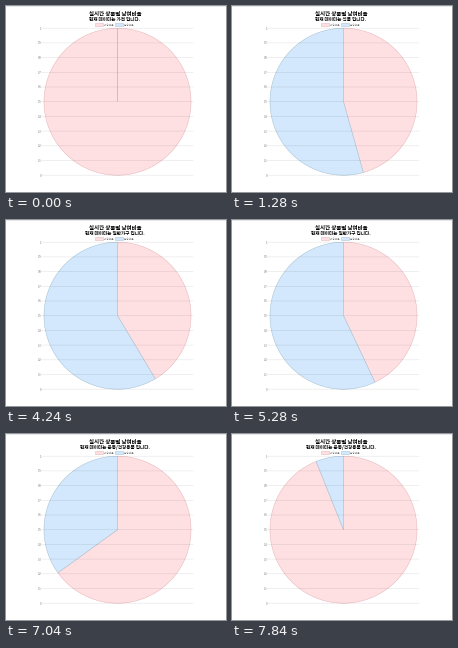
Animation of 220x186 px, one loop 8 s. Source, as a matplotlib script:

```python
import numpy as np
import matplotlib.pyplot as plt
from matplotlib.animation import FuncAnimation
from matplotlib.patches import Polygon, Rectangle

W, H, DPI = 220, 186, 100
STEP, LOOP = 80, 8000
PX = 72 / DPI
CENTER, RADIUS = np.array([111.5, 95.7]), 73.5
FONT = "Noto Sans CJK JP"

# Fill and outline of each slice
PINK = ("#fee0e3", "#e6b4b8")
BLUE = ("#d3e8fc", "#a3c0d2")

# Pink share in degrees: start ms, duration ms, ease-out power, from, to
SWEEPS = [
    (680, 1300, 3.05, 360, 129.5),
    (3880, 1150, 4, 129.5, 154.7),
    (6888, 1150, 4, 154.7, 338.3),
]
CAPTIONS = [(0, "가전"), (640, "식품"), (3840, "일반가구"), (6800, "운동/건강용품")]

fig = plt.figure(figsize=(W / DPI, H / DPI), dpi=DPI, facecolor="white")
ax = fig.add_axes([0, 0, 1, 1])
ax.set_xlim(0, W)
ax.set_ylim(H, 0)
ax.axis("off")


def label(x, y, text, size, color="#777777", **style):
    style = {"ha": "center", "va": "center_baseline", **style}
    return ax.text(x, y, text, fontsize=size * PX, color=color, family=FONT, **style)


def rule(x0, x1, y, color, width, **style):
    ax.plot([x0, x1], [y, y], color=color, lw=width * PX, snap=False, **style)


def shade(colors):
    return dict(facecolor=colors[0], edgecolor=colors[1], lw=0.5 * PX, joinstyle="bevel")


def sector(start, end):
    angle = np.radians(np.linspace(start, end, 181))
    rim = CENTER + RADIUS * np.column_stack([np.sin(angle), -np.cos(angle)])
    return np.vstack([CENTER, rim])


def pink_angle(ms):
    angle = SWEEPS[0][3]
    for start, duration, power, a, b in SWEEPS:
        if ms >= start:
            t = min((ms - start) / duration, 1)
            angle = b - (b - a) * (1 - t) ** power
    return angle


rule(0, W, 0.5, "#e6e9ec", 1)
for k in range(11):
    y = CENTER[1] + RADIUS * (k / 5 - 1)
    rule(35, 187, y, (0, 0, 0, 0.1), 0.6, zorder=3)
    label(35.4, y, f"{1 - k / 10:.1g}" if k < 10 else "0", 2.6, ha="right")

for x, colors, name in [(89, PINK, "여성 비율"), (109, BLUE, "남성 비율")]:
    ax.add_patch(Rectangle((x, 17.4), 8.2, 2.2, **shade(colors)))
    label(x + 9, 18.5, name, 2.5, ha="left")

label(109, 8.5, "실시간 상품별 남여비율", 5.5, "black", weight="bold")
caption = label(109, 13.2, "", 4.6, "black", weight="bold")

pink = ax.add_patch(Polygon(sector(0, 360), closed=True, **shade(PINK)))
blue = ax.add_patch(Polygon(sector(360, 360), closed=True, **shade(BLUE)))


def update(i):
    ms = i * STEP
    angle = pink_angle(ms)
    pink.set_xy(sector(0, angle))
    blue.set_xy(sector(angle, 360))
    blue.set_visible(angle < 360)
    topic = [name for start, name in CAPTIONS if ms >= start][-1]
    caption.set_text(f"현재 데이터는 {topic} 입니다.")
    return pink, blue, caption


anim = FuncAnimation(fig, update, frames=LOOP // STEP, interval=STEP, repeat=True, repeat_delay=0)
plt.show()
```
